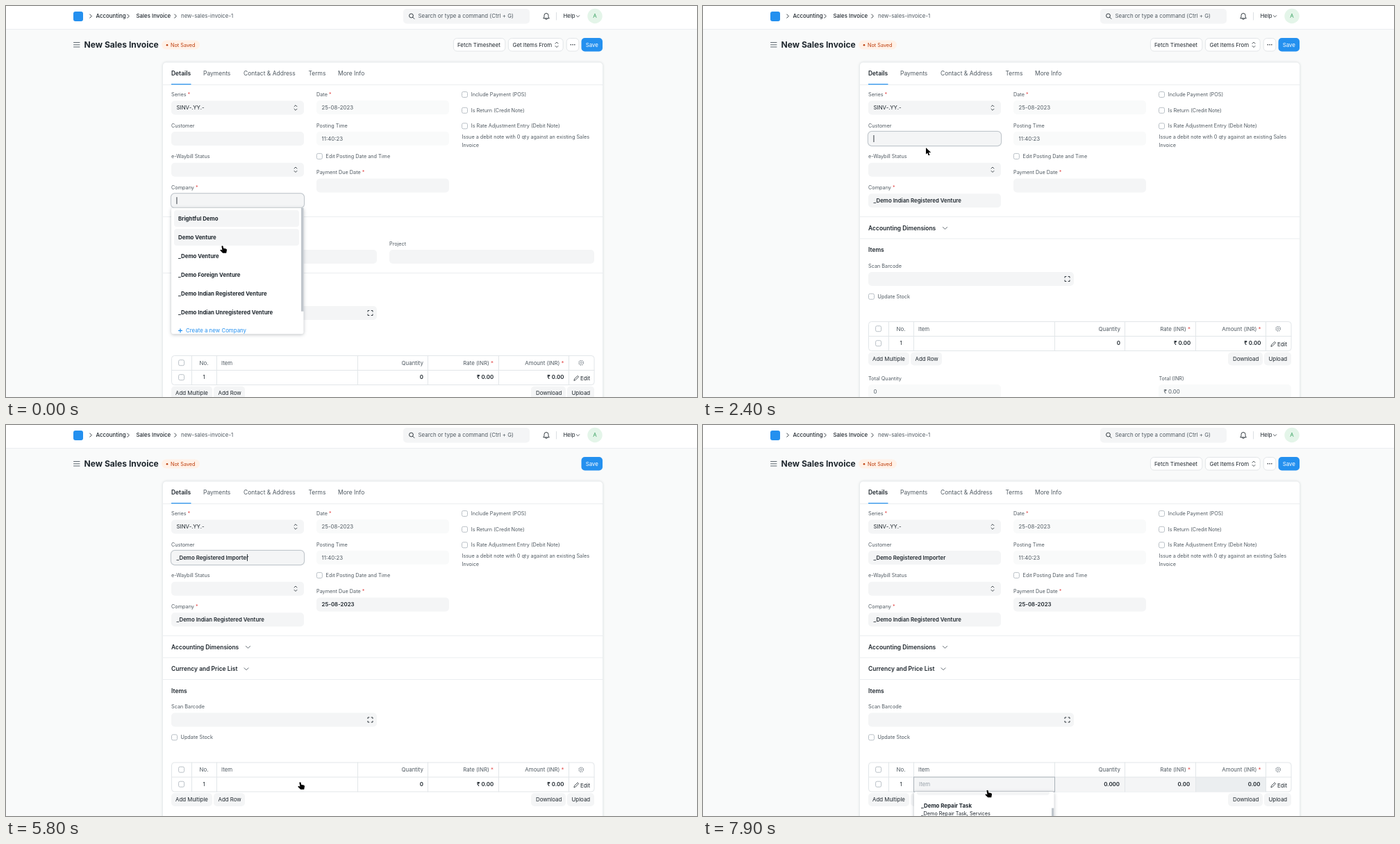
Recreate the animation shown at these times as an HTML page. Size 995x563 px, loop 8000 ms.

```html
<!DOCTYPE html>
<html lang="en">
<head>
<meta charset="utf-8">
<title>New Sales Invoice</title>
<style>
html, body { margin: 0; width: 100%; height: 100%; overflow: hidden; background: #f9fafa; }
svg { display: block; }
text { font-family: Inter, "Noto Sans", sans-serif; white-space: pre; }
</style>
</head>
<body>
<svg id="stage" width="995" height="563" viewBox="0 0 995 563"></svg>
<script>
const DARK = '#1f272e', GREY = '#505a62', BLUE = '#2490ef', FIELD = '#f4f5f6', PALE = '#f9fafa', LINE = '#ebeef0';
const SMALL = 7.27, BODY = 7.88, HEAD = 8.48;
const COMPANY = '_Demo Indian Registered Venture';
const CUSTOMER = '_Demo Registered Importer';
const companies = ['Brightful Demo', 'Demo Venture', '_Demo Venture', '_Demo Foreign Venture', COMPANY,
  '_Demo Indian Unregistered Venture'];
const customers = ['_Demo Importer', CUSTOMER, '_Demo Importer 1', '_Demo Importer 2', '_Demo Foreign Importer',
  '_Demo Unregistered Importer'];
const products = [['_Demo Trading Goods', 'Products'], ['_Demo Stock Parcel', 'Products'],
  ['_Demo Repair Task', 'Services'], ['_Demo Spare Parts', 'Products']];

// pointer: time, x, y of its top left corner
const path = [[0, 308, 345], [300, 308, 417], [600, 308, 417], [1100, 298, 111], [1500, 316, 169], [1900, 322, 192],
  [2400, 321, 204], [3600, 321, 204], [3700, 323, 230], [3800, 323, 230], [3900, 328, 222], [4000, 328, 222],
  [4100, 334, 209.5], [4800, 334, 209.5], [4900, 387, 229], [5100, 387, 229], [5800, 420, 514], [6300, 420, 514],
  [6700, 485, 489], [6900, 485, 489], [7300, 420, 530], [7800, 407, 532], [7900, 406, 525.5]];

const within = (t, a, b) => t >= a && t < b;

// y is the middle of the capitals
function txt(x, y, s, size = BODY, fill = DARK, weight = 400, anchor = 'start') {
  return `<text x="${x}" y="${y + size * .364}" font-size="${size}" fill="${fill}" font-weight="${weight}" text-anchor="${anchor}">${s}</text>`;
}
function box(x, y, w, h, fill, r = 0, stroke = 'none', more = '') {
  return `<rect x="${x}" y="${y}" width="${w}" height="${h}" rx="${r}" fill="${fill}" stroke="${stroke}" ${more}/>`;
}
function line(d, stroke = LINE, width = 1, fill = 'none') {
  return `<path d="${d}" fill="${fill}" stroke="${stroke}" stroke-width="${width}" stroke-linecap="round" stroke-linejoin="round"/>`;
}
const star = s => s + ' <tspan fill="#e24c4c">*</tspan>';
const label = (x, y, s) => txt(x, y, s, SMALL, GREY);
const rule = y => line(`M226 ${y}H859`);
const down = (x, y) => line(`M${x - 3} ${y - 1.4}l3 3 3-3`, GREY, .9);
const right = x => line(`M${x - 1.3} 12l2.6 2.6-2.6 2.6`, DARK, .9);
const updown = (x, y) => line(`M${x - 2} ${y - 1.7}l2-2 2 2M${x - 2} ${y + 1.7}l2 2 2-2`, DARK, .8);
const check = (x, y) => box(x, y - 4, 8, 8, '#fff', 2, '#a9b2b9', 'stroke-width=".8"');
const caret = (x, y) => box(x, y - 5, .9, 10, DARK);
const button = (x, y, w, s, pad) => box(x, y - 9.5, w, 19, FIELD, 5) + txt(x + pad, y, s);

function field(x, y, w, s = '', fill = FIELD, color = DARK, weight = 400) {
  return box(x, y - 10, w, 20, fill, 5) + txt(x + 7.5, y, s, BODY, color, weight);
}
function focusRing(y) {
  return box(237.8, y - 10.3, 191.4, 20.6, FIELD, 5, '#d5d9dd', 'stroke-width="2"') +
    box(238, y - 10, 191, 20, FIELD, 4.5, '#a2abb3', 'stroke-width=".8"');
}
function linkField(y, value, focused, caretX) {
  return (focused ? focusRing(y) : '') + field(238, y, 191, value, FIELD, DARK, 600) +
    (caretX ? caret(caretX, y) : '');
}

function navbar() {
  return box(0, 0, 995, 33, '#fff') + line('M0 33.5H995') +
    box(97, 8, 14, 14, BLUE, 3) + right(122) + right(176) + right(244) +
    txt(129.5, 14.5, 'Accounting', BODY, DARK, 500) + txt(187.5, 14.5, 'Sales Invoice', BODY, DARK, 500) +
    txt(252, 14.5, 'new-sales-invoice-1', BODY, GREY) +
    box(572, 4, 182, 21.5, FIELD, 5) + txt(593.5, 14.5, 'Search or type a command (Ctrl + G)', BODY, GREY) +
    `<circle cx="583.5" cy="14" r="2.9" fill="none" stroke="${DARK}" stroke-width=".9"/>` + line('M585.7 16.2l2.3 2.3', DARK, .9) +
    line('M774 17.5c1-1 1-2 1-4a3 3 0 0 1 6 0c0 2 0 3 1 4zM776.6 18.8q1.4 1.4 2.8 0', DARK, .9) +
    line('M792.5 9.5V20', '#dce0e3') + txt(802.5, 14.5, 'Help') + line('M821.4 13.7l2.1 2.1 2.1-2.1', DARK, .8) +
    '<circle cx="848" cy="14.5" r="10.7" fill="#e4f5e9"/>' + txt(848, 14.5, 'A', BODY, '#38a160', 400, 'middle');
}

function pageHead(showButtons) {
  const plain = (x, w) => box(x, 46.5, w, 18.5, '#fff', 5, '#dce0e3', 'stroke-width=".8"');
  let s = line('M97.5 52.5h8.5M97.5 55.8h8.5M97.5 59h8.5', GREY, .9) +
    txt(112.5, 55.5, 'New Sales Invoice', 12.1, DARK, 700) +
    box(224, 49.5, 55, 13, '#fff1e7', 6.5) + '<circle cx="232" cy="56.3" r="1.3" fill="#bd3e0c"/>' +
    txt(237, 56, 'Not Saved', SMALL, '#bd3e0c') +
    box(828.5, 46, 30.5, 19.5, BLUE, 5) + txt(843.8, 55.8, 'Save', BODY, '#fff', 400, 'middle');
  if (showButtons) {
    s += plain(644.4, 74.4) + txt(650, 55.8, 'Fetch Timesheet') +
      plain(723.4, 78.8) + txt(729.5, 55.8, 'Get Items From') + updown(793, 55.8) + plain(807.2, 17.6);
    for (const x of [813.2, 816, 818.8]) s += `<circle cx="${x}" cy="55.8" r=".8" fill="${DARK}"/>`;
  }
  return s;
}

function card() {
  const tabs = [[284, 'Payments'], [342, 'Contact &amp; Address'], [435.5, 'Terms'], [478, 'More Info']];
  return box(225.5, 81, 634, 500, '#fff', 5, '#eaedef', 'style="filter:drop-shadow(0 0 1.5px rgba(25,39,52,.12))"') +
    rule(113.5) + box(238, 112, 28.5, 1.2, BLUE) + txt(238, 97, 'Details', HEAD, DARK, 600) +
    tabs.map(([x, s]) => txt(x, 97, s, HEAD, GREY)).join('');
}

function details(t) {
  const hasCompany = t >= 700, hasCustomer = t >= 3900;
  const inCompany = t < 1900, inCustomer = within(t, 1900, 6100);
  const companyCaret = t < 200 ? 245.5 : within(t, 700, 1600) ? 370.6 : 0;
  const customerCaret = within(t, 1900, 3700) ? 245.5 : within(t, 3900, 4900) || within(t, 5300, 6100) ? 347 : 0;
  const option = (x, y, s) => check(x, y) + label(x + 13.2, y, s);
  return label(238, 127.5, star('Series')) + field(238, 146.5, 191, 'SINV-.YY.-') + updown(417, 146.5) +
    label(238, 172.5, 'Customer') + linkField(191, hasCustomer ? CUSTOMER : '', inCustomer, customerCaret) +
    label(238, 216.5, 'e-Waybill Status') + field(238, 235.7, 191) + updown(417, 235.7) +
    label(238, 261.5, star('Company')) + linkField(280.2, hasCompany ? COMPANY : '', inCompany, companyCaret) +
    label(447, 127.5, star('Date')) + field(447, 146, 191, '25-08-2023', PALE, GREY) +
    label(447, 172.5, 'Posting Time') + field(447, 190.8, 191, '11:40:23', PALE, GREY) +
    option(447.4, 216.4, 'Edit Posting Date and Time') +
    label(447, 239.7, star('Payment Due Date')) +
    field(447, 258.5, 191, t >= 4600 ? '25-08-2023' : '', FIELD, DARK, 600) +
    option(656.5, 127.5, 'Include Payment (POS)') + option(656.5, 150.3, 'Is Return (Credit Note)') +
    option(656.5, 172.8, 'Is Rate Adjustment Entry (Debit Note)') +
    label(656.5, 188.8, 'Issue a debit note with 0 qty against an existing Sales') + label(656.5, 200.3, 'Invoice');
}

function sections(t) {
  const head = (y, s) => txt(238, y, s, HEAD, DARK, 600);
  let s = rule(303.5) + head(319.5, 'Accounting Dimensions') + down(348.5, 319.8);
  if (t < 700) {
    s += label(238, 342, 'Cost Center') + label(552, 342, 'Project') + field(238, 361, 296) + field(552, 361, 295) + rule(384.5);
  } else s += rule(335);
  if (t >= 4100) s += head(351, 'Currency and Price List') + down(346, 351.2) + rule(366.5);
  return s + `<g transform="translate(0 ${t < 700 ? 49 : t < 4100 ? 0 : 31.5})">${items(t)}</g>`;
}

function items(t) {
  const editing = t >= 6100;
  const [cols, top, mid, bottom] = [[267.5, 303.5, 506.5, 607.5, 709.5, 810.5], 454.5, 475.5, 496.5];
  const end = (x, y, s, color, weight) => txt(x, y, s, BODY, color, weight, 'end');
  let s = txt(238, 351, 'Items', HEAD, DARK, 600) + label(238, 374, 'Scan Barcode') + field(238, 393, 296) +
    line('M521 391.2v-1.7h1.9M526.1 389.5h1.9v1.7M528 394.8v1.7h-1.9M522.9 396.5h-1.9v-1.7', DARK, .9) +
    check(238.5, 418.3) + label(251.5, 418.3, 'Update Stock');

  s += box(238.5, top, 608.5, bottom - top, '#fff', 4, '#e2e6e9');
  if (editing) s += box(507, mid, 202, 21, FIELD) + box(709.5, mid, 101, 21, LINE);
  s += line(`M238.5 ${mid}H847` + cols.map(x => `M${x} ${top}V${bottom}`).join(''), '#e2e6e9');
  s += check(248.6, 464.7) + txt(285, 464.7, 'No.', BODY, GREY, 400, 'middle') + txt(310, 464.7, 'Item', BODY, GREY) +
    end(601, 464.7, 'Quantity', GREY) + end(702, 464.7, star('Rate (INR)'), GREY) + end(803.5, 464.7, star('Amount (INR)'), GREY) +
    '<circle cx="828.2" cy="464.7" r="3.3" fill="none" stroke="#7c858d" stroke-width="1.1" stroke-dasharray="1.7 .9"/>' +
    '<circle cx="828.2" cy="464.7" r="1.3" fill="none" stroke="#7c858d" stroke-width=".7"/>';
  s += check(248.6, 485.7) + txt(285, 485.5, '1', BODY, DARK, 400, 'middle');
  const values = editing ? ['0.000', '0.00', '0.00'] : ['0', '₹ 0.00', '₹ 0.00'];
  values.forEach((v, i) => s += end((editing ? 600 : 601) + i * 101.2, 485.5, v, DARK, 600));
  s += line('M818 490l.5-2 4.6-4.6 1.5 1.5-4.6 4.6z', DARK, .8) + txt(827, 487.2, 'Edit');
  if (editing) {
    s += box(303.5, mid, 203, 21, FIELD, 0, '#aab2b9') + txt(311, 485.5, 'Item', BODY, '#98a1a9');
    if (within(t, 6100, 6400) || within(t, 7000, 7400) || within(t, 7800, 7900)) s += caret(311, 485.5);
  }
  s += button(238, 508, 59, 'Add Multiple', 6) + button(299, 508, 45, 'Add Row', 6.5) +
    button(756, 508, 50, 'Download', 7) + button(808, 508, 39, 'Upload', 6.5);
  return s + label(238, 536.5, 'Total Quantity') + field(238, 555, 191, '0', PALE, GREY) +
    label(656.5, 536.5, 'Total (INR)') + field(656, 555, 191, '₹ 0.00', PALE, GREY);
}

const popup = (x, y, w, h) => box(x, y, w, h, '#fff', 3, 'none', 'style="filter:drop-shadow(0 1px 2.5px rgba(25,39,52,.3))"');

function linkList(y, names, kind, lit) {
  let s = popup(238, y, 190.5, 181.5) + `<svg x="238" y="${y}" width="191" height="181.5">`;
  names.forEach((name, i) => {
    if (lit.includes(i)) s += box(4, 3.3 + 27 * i, 180, 24, FIELD, 4);
    s += txt(10, 15.3 + 27 * i, name, BODY, DARK, 700);
  });
  return s + line('M10.5 176.7h5M13 174.2v5', BLUE, 1.2) + txt(21, 176.8, `Create a new ${kind}`, BODY, BLUE) +
    box(187, 0, 3.5, 149, '#c0c6cc') + '</svg>';
}

function itemList(t) {
  const p = Math.min(1, Math.max(0, (t - 7300) / 500));
  const scroll = 68.5 * p * p * (3 - 2 * p);
  let s = popup(304, 528, 201.5, 60) + '<svg x="304" y="528" width="202" height="35">';
  products.forEach(([name, group], i) => {
    const y = 3.5 + 36.5 * i - scroll;
    if (i == 0 || i == 1 && p > .5) s += box(4, y, 191, 33.5, FIELD, 4);
    s += txt(10, y + 12, name, BODY, DARK, 700) + txt(10, y + 23.3, `${name}, ${group}`, SMALL, DARK);
  });
  return s + box(198, 1 + scroll * .33, 3.3, 60, '#c0c6cc') + '</svg>';
}

function pointer(t) {
  if (within(t, 4600, 4900)) return '';
  const i = path.findIndex(k => k[0] >= t);
  const b = path[i], a = path[Math.max(0, i - 1)];
  const p = b[0] > a[0] ? (t - a[0]) / (b[0] - a[0]) : 1;
  const [x, y] = [1, 2].map(n => a[n] + (b[n] - a[n]) * p);
  const hand = t < 1500 || within(t, 3700, 3900) || within(t, 5600, 6400) || t >= 7300;
  const shape = hand
    ? 'M2.4 1Q3.3-.5 4.5.8L5.3 4 8.6 4.6Q10.2 5 10 6.6L9.2 10.8H4.2L.4 7Q.4 5.6 2 6L3.4 6.8Z'
    : 'M0 0V9.6L2.2 7.6 3.8 11.2 5.5 10.5 3.9 7H7.2Z';
  return `<path transform="translate(${x} ${y})" d="${shape}" stroke="#fff" stroke-width=".7" paint-order="stroke"/>`;
}

function scene(t) {
  return box(0, 0, 995, 563, PALE) + navbar() + pageHead(!within(t, 5400, 6100)) + card() + details(t) + sections(t) +
    (t < 700 ? linkList(290.7, companies, 'Company', [0, 1]) : '') +
    (within(t, 3400, 3900) ? linkList(202, customers, 'Customer', t < 3500 ? [0] : [0, 1]) : '') +
    (t >= 7000 ? itemList(t) : '') + pointer(t);
}

const stage = document.getElementById('stage');
let shown = -1;
function tick() {
  const t = Math.floor(performance.now() % 8000 / 100) * 100;
  if (t != shown) stage.innerHTML = scene(shown = t);
  requestAnimationFrame(tick);
}
tick();
</script>
</body>
</html>
```
